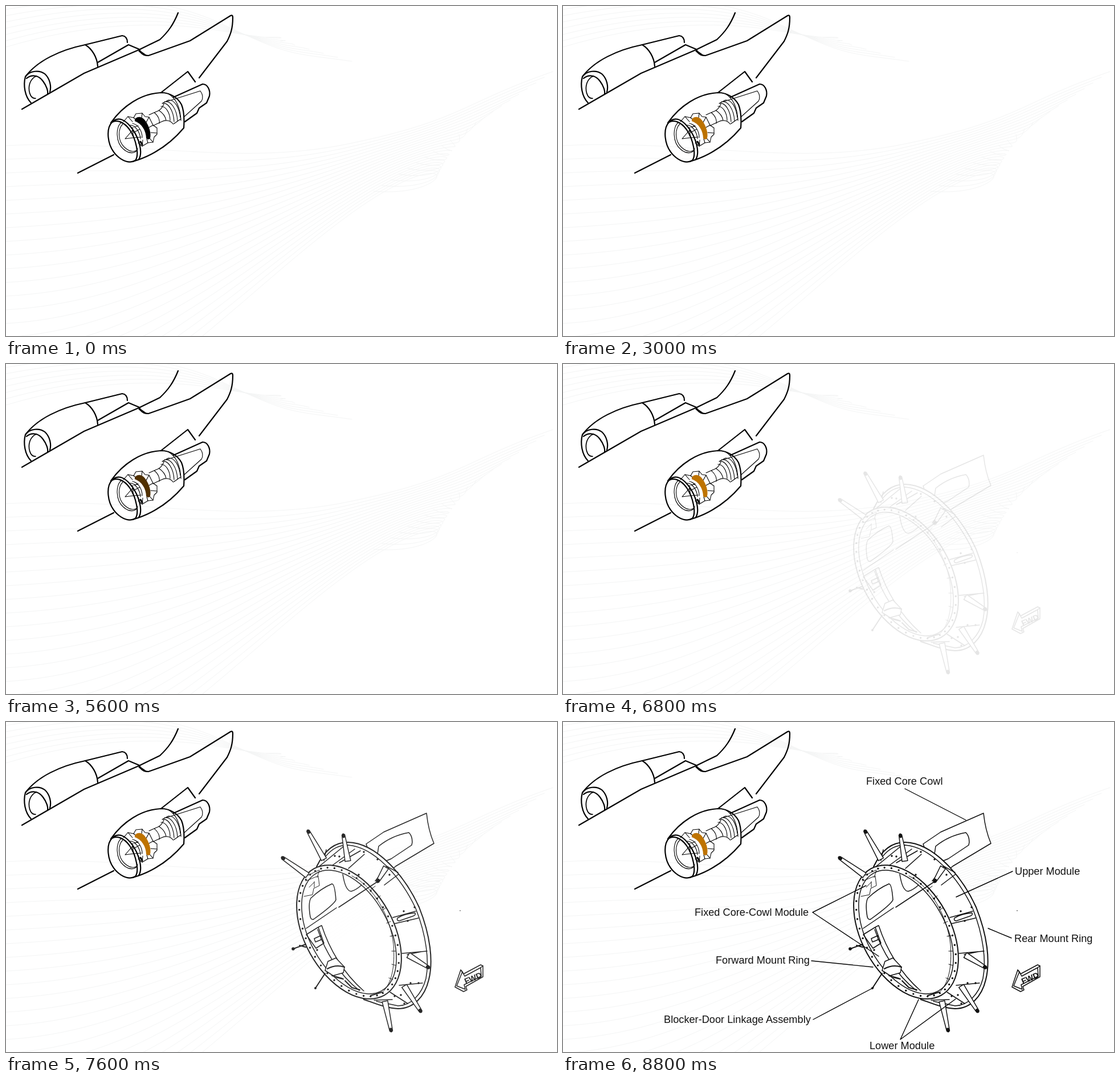
These frames come from a looping animation (967 by 579 pixels, 9000 ms). An HTML page:

```html
<!DOCTYPE html>
<html lang="en">
<head>
<meta charset="utf-8">
<title>Fixed core cowl</title>
<style>
html, body { margin: 0; width: 100%; height: 100%; overflow: hidden; background: #fff; }
svg { display: block; width: 967px; height: 579px; }
path, ellipse { fill: none; stroke-linecap: round; stroke-linejoin: round; }
#waves { stroke: #f4f5f5; }
#plane { stroke: #000; stroke-width: 2.2; }
#plane .thin { stroke-width: 1.1; }
#ring { stroke: #111; stroke-width: 1.5; }
#ring .thin { stroke-width: 1; }
#ring .white { fill: #fff; }
#labels { stroke: #000; stroke-width: 1.4; }
text { font-family: "Liberation Sans", Arial, sans-serif; font-size: 18.2px; fill: #111; stroke: none; }
</style>
</head>
<body>
<svg viewBox="0 0 967 579">
  <g id="waves"></g>

  <g id="plane">
    <!-- far engine and wing -->
    <path d="M34 124C55 96 95 77 139 68L204 52C211 53 213 58 213 64"/>
    <path d="M139 68C151 75 160 90 161 106"/>
    <path d="M44 170C33 159 30 139 34 124C42 113 59 112 68 119C77 127 80 141 77 151"/>
    <path d="M36 127C46 119 58 122 65 132C71 140 74 149 73 154"/>
    <path d="M52 162C42 163 38 147 42 135C45 128 49 124 54 123" stroke-width="1.7"/>
    <path d="M28 181L137 118L233 77L270 59C285 45 294 32 302 12"/>
    <path d="M161 99L215 68L234 76C236 84 242 87 250 87L323 61L394 17Q398 15 398 20C398 40 394 50 388 62L339 126"/>
    <path d="M234 79L244 86" stroke-width="3"/>
    <path d="M272 152L319 115L332 133M126 293L189 261"/>
    <!-- near engine -->
    <path d="M184 205C205 175 237 154 272 152C287 152 301 160 308 173C313 185 313 200 312 214C290 240 260 262 222 273"/>
    <path d="M186 204C176 214 176 244 194 262C204 272 217 277 227 271C234 262 229 235 217 217C207 203 194 199 186 204"/>
    <path d="M189 201C200 194 212 202 222 216C235 235 240 258 233 269"/>
    <path d="M285 154C298 162 306 178 307 201" class="thin"/>
    <path d="M294 160L345 137C354 137 359 148 357 158L352 170L339 179L335 188L314 203"/>
    <path class="thin" d="M281 168L341 149C346 156 346 162 343 167L313 194"/>
    <!-- core -->
    <g class="thin">
      <path d="M203 204C192 211 192 239 206 251C216 260 228 260 231 250M205 207C196 216 196 237 208 248C216 255 224 257 230 253"/>
      <path d="M209 233L222 218L224 231ZM218 209C226 209 235 220 236 233M222 206C232 208 239 219 239 231M221 214L232 210M224 222L235 216M225 231L237 230"/>
      <path d="M206 203L214 194L224 196L228 189L239 188L244 194L251 195L255 203L258 209L265 214L265 225L260 230L258 239L249 240L239 246L232 240"/>
      <path d="M214 194L222 203M224 196L230 201M239 188L238 196M251 195L246 204M258 209L251 213M265 223L254 222M258 239L252 232M239 246L240 235M249 240L247 233"/>
      <path d="M251 191L267 184C273 181 275 177 277 172M258 210L273 203C281 199 289 201 293 207M260 187C268 193 270 201 269 206M268 183C276 188 280 195 281 201"/>
      <path d="M274 171C284 168 294 183 295 203M278 168C289 165 300 181 301 202M285 165C296 164 304 178 306 196M272 176C281 176 288 188 288 201M274 171L285 165M294 207L307 198"/>
      <path d="M236 238L239 243" stroke-width="3"/>
    </g>
    <path id="band" stroke="none" d="M226 199C230 193 239 193 245 202C252 212 255 224 253 232C251 235 248 234 246 232C246 219 238 206 226 202Z"/>
  </g>

  <g id="ring">
    <path class="white" d="M632 214L663 193L738 160C740 179 745 199 751 213L684 253L655 279Z"/>
    <path d="M654 218C670 205 690 197 707 194C713 200 714 210 712 216L676 240C660 247 648 250 651 238Z"/>
    <path class="white" stroke-width="2" d="M545 254C560 223 578 211 600 211C650 212 700 270 725 325C745 375 750 420 742 452C735 482 715 503 688 503C665 502 645 492 628 487Z"/>
    <path d="M560 237C572 222 584 216 600 216C645 219 692 270 719 327C738 375 743 420 737 450C730 478 710 498 688 498L650 490"/>
    <path d="M550 253L594 217M568 255L612 223M585 247L622 226M558 243L562 224M601 257L629 232M648 279L668 253L688 264M664 286L689 267"/>
    <path d="M679 343L719 332M681 354L724 344M687 344Q700 336 718 335Q720 339 713 341L690 349Q685 348 687 344M695 406L739 402M704 408L729 403M690 462L731 458M674 474L705 494M646 488L678 487"/>
    <g transform="rotate(61 602 368.5)">
      <ellipse class="white" cx="602" cy="368.5" rx="127" ry="78" stroke-width="2"/>
      <ellipse cx="602" cy="368.5" rx="118" ry="69"/>
    </g>
    <path class="thin" d="M607 270C646 289 674 340 680 390C683 430 677 458 661 474M640 294L648 288M649 310L657 305M660 330L667 326M668 353L675 350M674 376L681 375M677 402L684 402M677 425L684 427M672 449L679 452"/>
    <!-- cowl inside the ring -->
    <path d="M527 362L580 326M584 325L655 278M535 309Q553 292 572 284Q577 284 579 312Q576 320 540 346Q536 348 534 342Q530 318 535 309"/>
    <path d="M591 267C594 286 599 297 606 297Q614 295 624 286"/>
    <path class="thin" d="M526 279L548 270L550 287L540 292L538 303L523 306M532 290L541 281M541 280V290M530 269L549 260M546 273L550 260"/>
    <path d="M527 373L548 360L558 388L544 397ZM548 360L554 357C567 397 591 440 628 472M547 364C560 402 584 443 620 471M541 380L552 375L553 382L543 386Z"/>
    <path class="white" d="M565 420L579 414L594 430L592 440L574 445L560 436Z"/>
    <path d="M564 433Q579 425 594 430M572 445L590 450M580 448L592 451M595 454L607 466L621 470M640 480L660 474" stroke-width="2"/>
    <g id="rods"></g>
    <g id="dots" fill="#111" stroke="none"></g>
    <path d="M504 398L526 390M543 467L560 441M515 392L526 395" stroke-width="2"/>
    <!-- direction arrow -->
    <path class="white" d="M788 465L798 435L803 442L833 426L837 428L837 447L807 464L809 470L803 473Z"/>
    <path d="M791 463L801 438L805 446L833 431L834 446L804 461L806 469ZM833 431L837 428M801 438L798 435"/>
    <text transform="translate(807 460) rotate(-23)" style="font-size:14px;font-weight:bold">FWD</text>
  </g>

  <g id="labels">
    <path d="M600 117L707 172M789 262L690 307M532 287L438 334L554 411M787 379L746 362M436 419L544 430M439 522L545 466M624 487L592 557L689 486"/>
    <text x="532" y="110">Fixed Core Cowl</text>
    <text x="793" y="268">Upper Module</text>
    <text x="231" y="340">Fixed Core-Cowl Module</text>
    <text x="792" y="386">Rear Mount Ring</text>
    <text x="268" y="424">Forward Mount Ring</text>
    <text x="177" y="528">Blocker-Door Linkage Assembly</text>
    <text x="538" y="574">Lower Module</text>
  </g>
</svg>
<script>
const $ = id => document.getElementById(id);
const add = (id, markup) => $(id).insertAdjacentHTML('beforeend', markup);
const clamp = v => Math.max(0, Math.min(1, v));

// faint flowing lines
for (let i = 0; i < 22; i++) {
  const y = 245 + 24 * i, m = 228 + 6 * i;
  add('waves', `<path d="M0 ${y}C220 ${y - 12} 400 ${m + 55 + 5 * i} 600 ${m + 14}S800 ${170 + 8 * i} ${960 - 15 * i} ${115 + 10 * i}"/>`);
}
for (let i = 0; i < 7; i++) {
  add('waves', `<path d="M0 ${6 + 11 * i}C130 ${-15 + 8 * i} 260 ${-25 + 8 * i} 380 ${32 + 2 * i}S500 ${82 - 5 * i} ${607 - 25 * i} ${97 - 7 * i}"/>`);
}

// tapered rods, from dark tip to wide base
function rod(x, y, bx, by) {
  const len = Math.hypot(bx - x, by - y), nx = (y - by) / len, ny = (bx - x) / len;
  const at = (px, py, w) => `${px + nx * w} ${py + ny * w}`;
  add('rods', `<path class="white" d="M${at(x, y, 2.5)}L${at(bx, by, 5)}L${at(bx, by, -5)}L${at(x, y, -2.5)}Z"/>
    <path stroke-width="5" d="M${x} ${y}l${(bx - x) / len * 3} ${(by - y) / len * 3}"/>`);
}
rod(530, 191, 558, 241);
rod(485, 238, 529, 269);
rod(592, 198, 600, 244);
rod(742, 431, 706, 409);
rod(728, 508, 699, 463);
rod(676, 542, 665, 490);
rod(652, 280, 667, 255);

// bolts
const dot = (x, y, r = 1.7) => add('dots', `<circle cx="${x}" cy="${y}" r="${r}"/>`);
const tilt = 61 * Math.PI / 180;
for (let i = 0; i < 42; i++) {
  const a = i / 42 * 2 * Math.PI, u = 122.5 * Math.cos(a), v = 73.5 * Math.sin(a);
  dot(602 + u * Math.cos(tilt) - v * Math.sin(tilt), 368.5 + u * Math.sin(tilt) + v * Math.cos(tilt));
}
[[577, 235], [585, 236], [619, 268], [628, 228], [652, 241], [673, 268], [698, 332], [717, 325], [705, 349],
 [710, 458], [724, 458], [682, 481], [693, 479], [699, 494], [546, 400]].forEach(p => dot(...p));
dot(504, 398, 2.8);
dot(543, 467, 2);
dot(797, 331, 0.8);

function glow(t) {
  if (t < 400) return 0;
  const phase = t < 6080 ? (t - 90) / 1985 : Math.min(0.5, (t - 6080) / 1440);
  return (1 - Math.cos(2 * Math.PI * phase)) / 2;
}

function draw(now) {
  const t = Math.floor(now % 9000 / 200) * 200, g = glow(t);
  $('band').style.fill = `rgb(${190 * g},${115 * g},0)`;
  $('ring').style.opacity = clamp((t - 6700) / 1000);
  $('labels').style.opacity = clamp((t - 7700) / 1000);
}

const start = performance.now();
function tick() {
  draw(performance.now() - start);
  requestAnimationFrame(tick);
}
tick();
</script>
</body>
</html>
```
